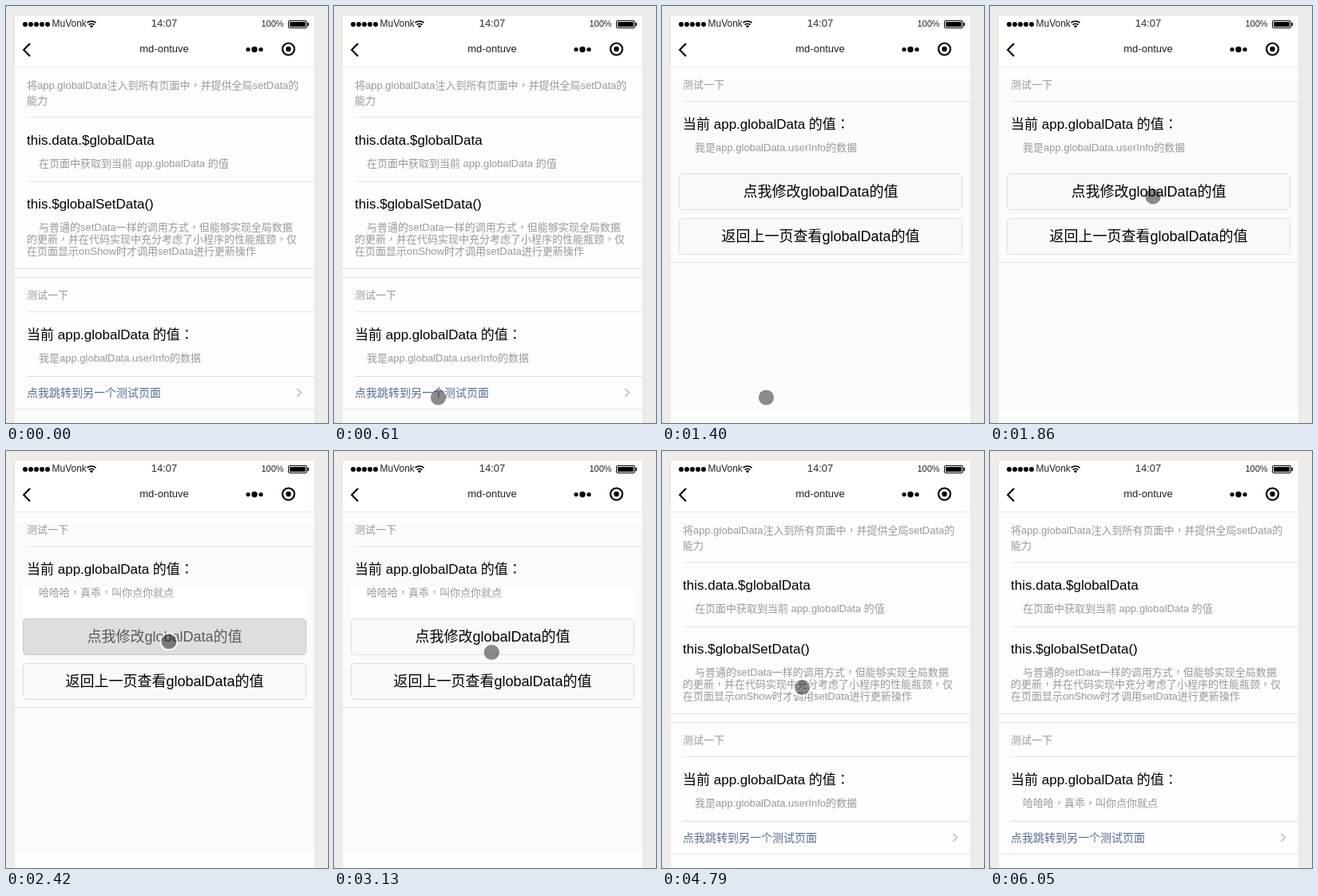
Animation, 403 px wide and 523 px high, one loop 6.96 s. Source, as an HTML page:

```html
<!DOCTYPE html>
<html lang="zh-CN">
<head>
<meta charset="utf-8">
<style>
  html, body { margin: 0; width: 100%; height: 100%; overflow: hidden; background: #edece8; }
  svg { display: block; }
  text { font-family: "Liberation Sans", "Noto Sans CJK SC", "Noto Sans CJK", sans-serif; white-space: pre; }
  .mark { font-family: "Noto Sans CJK TC", "Noto Sans CJK", sans-serif; }
</style>
</head>
<body>
<svg id="stage" width="403" height="523" viewBox="0 0 403 523">
  <defs><clipPath id="screen"><rect x="11" y="12" width="375" height="511"/></clipPath></defs>
  <rect width="403" height="523" fill="#edece8"/>
  <rect x="10.5" y="11.5" width="376" height="520" fill="#fdfdfd" stroke="#e6e5e1"/>
  <g clip-path="url(#screen)">
    <g id="home">
      <rect id="cellHover" x="11" y="465" width="375" height="40" fill="#ececec"/>
      <rect id="linkHover" x="26" y="474" width="330" height="22" fill="#000" fill-opacity=".08"/>
      <path d="M364 480l5.5 5-5.5 5" fill="none" stroke="#c8c8cd" stroke-width="2"/>
    </g>
    <g id="detail">
      <rect x="11" y="93" width="375" height="413" fill="#fbfbfb"/>
      <rect id="band" x="21" y="171" width="355" height="39" fill="#fff"/>
    </g>
    <rect x="11" y="12" width="375" height="64" fill="#fff"/>
    <rect x="11" y="76" width="375" height="1" fill="#e6e6e6"/>
    <g id="bar">
      <path d="M24 23h28.1" stroke="#000" stroke-width="6" stroke-linecap="round" stroke-dasharray="0 7"/>
      <g fill="none" stroke="#000" stroke-width="1.7">
        <path d="M101.5 21.2a8 8 0 0 1 11 0M103.6 23.6a5 5 0 0 1 6.8 0"/>
      </g>
      <path d="M107 27.6l-2.2-2.4a3.2 3.2 0 0 1 4.4 0z"/>
      <rect x="353.5" y="18.5" width="23" height="9" rx="1.5" fill="none" stroke="#000"/>
      <rect x="355" y="20" width="20" height="6"/>
      <path d="M377.5 21h1.5v4h-1.5z"/>
      <path d="M30 47l-7.8 8 7.8 8" fill="none" stroke="#000" stroke-width="2.1"/>
      <circle cx="303" cy="54.5" r="2.6"/>
      <circle cx="311" cy="54.5" r="3.7"/>
      <circle cx="319" cy="54.5" r="2.6"/>
      <circle cx="353.5" cy="54" r="7.5" fill="none" stroke="#000" stroke-width="2.2"/>
      <circle cx="353.5" cy="54" r="3.2"/>
    </g>
  </g>
  <g id="cursor">
    <circle r="9.6" fill="#000" fill-opacity=".45"/>
    <circle id="ring" r="10.4" fill="none" stroke="#fff" stroke-opacity=".8" stroke-width="1.8"/>
  </g>
</svg>
<script>
const LOOP = 6960, TICK = 90;
const GREY = '#999', BLACK = '#000';
const BEFORE = '我是app.globalData.userInfo的数据';
const AFTER = '哈哈哈，真乖，叫你点你就点';
const HEADING = '当前 app.globalData 的值：';
const $ = id => document.getElementById(id);

function add(parent, tag, attrs) {
  const el = document.createElementNS('http://www.w3.org/2000/svg', tag);
  for (const key in attrs) el.setAttribute(key, attrs[key]);
  return parent.appendChild(el);
}

// Traditional-style punctuation sits in the middle of its cell.
function write(el, content) {
  el.innerHTML = content.replace(/[，：]/g, '<tspan class="mark" lang="zh-Hant">$&</tspan>');
}
function label(parent, x, y, size, fill, content, anchor = 'start') {
  const el = add(parent, 'text', { x, y, 'font-size': size, fill, 'text-anchor': anchor });
  write(el, content);
  return el;
}
const rule = (parent, x, y, fill = '#e4e4e4') =>
  add(parent, 'rect', { x, y, width: 386 - x, height: 1, fill });

function button(parent, y, content) {
  const box = add(parent, 'rect', { x: 21.5, y: y + .5, width: 354, height: 45, rx: 4.5, fill: '#f9f9f9', stroke: '#dedede' });
  const text = label(parent, 198.5, y + 29, 18, BLACK, content, 'middle');
  return { box, text };
}

const bar = $('bar'), home = $('home'), detail = $('detail');
label(bar, 57.5, 26, 12, '#222', 'MuVonk');
label(bar, 198, 26, 13, '#333', '14:07', 'middle');
label(bar, 319.5, 26, 11, '#222', '100%');
label(bar, 198, 58, 13, '#222', 'md-ontuve', 'middle');

label(home, 26, 104, 13, GREY, '将app.globalData注入到所有页面中，并提供全局setData的');
label(home, 26, 123, 13, GREY, '能力');
rule(home, 26, 139);
label(home, 26, 174, 17, BLACK, 'this.data.$globalData');
label(home, 41, 202, 13, GREY, '在页面中获取到当前 app.globalData 的值');
rule(home, 26, 220);
label(home, 26, 254, 17, BLACK, 'this.$globalSetData()');
label(home, 41, 282, 13, GREY, '与普通的setData一样的调用方式，但能够实现全局数据');
label(home, 26, 297, 13, GREY, '的更新，并在代码实现中充分考虑了小程序的性能瓶颈，仅');
label(home, 26, 312, 13, GREY, '在页面显示onShow时才调用setData进行更新操作');
rule(home, 11, 329);
rule(home, 11, 340);
label(home, 26, 367, 13, GREY, '测试一下');
rule(home, 26, 383);
label(home, 26, 418, 17, BLACK, HEADING);
const homeValue = label(home, 41, 446, 13, GREY, BEFORE);
rule(home, 26, 464, '#dadada');
const link = label(home, 26, 490, 14, '#586c94', '点我跳转到另一个测试页面');
rule(home, 11, 505);

label(detail, 26, 103, 13, GREY, '测试一下');
rule(detail, 26, 119);
label(detail, 26, 154, 17, BLACK, HEADING);
const detailValue = label(detail, 41, 182, 13, GREY, BEFORE);
const edit = button(detail, 210, '点我修改globalData的值');
button(detail, 266, '返回上一页查看globalData的值');
rule(detail, 11, 321);

const within = (t, from, to) => t >= from && t < to;
const show = (el, on) => el.setAttribute('visibility', on ? 'visible' : 'hidden');
const easeOut = power => p => 1 - (1 - p) ** power;
const smooth = p => p * p * (3 - 2 * p);

// Progress that jumps once per tick; the first jump lands at `start`.
const steps = (t, start, count) =>
  Math.max(0, Math.min(count, Math.floor((t - start) / TICK) + 1)) / count;

const moves = [
  { start: 520, count: 2, to: [130.5, 491], ease: easeOut(2) },
  { start: 1590, count: 4, to: [204, 239], ease: easeOut(4) },
  { start: 3130, count: 8, to: [175.5, 296.5], ease: easeOut(2) },
  { start: 5690, count: 4, to: [258, 502], ease: smooth }
];

function cursorAt(t) {
  let [x, y] = [133, 511];
  for (const { start, count, to, ease } of moves) {
    const p = ease(steps(t, start, count));
    x += (to[0] - x) * p;
    y += (to[1] - y) * p;
  }
  return [x, y];
}

function draw(t) {
  const linkDown = within(t, 1040, 1400);
  show($('cellHover'), within(t, 1040, 1220));
  show($('linkHover'), linkDown);
  link.setAttribute('opacity', linkDown ? .65 : 1);
  write(homeValue, t < 4880 ? BEFORE : AFTER);

  const slide = easeOut(1.338)(steps(t, 1220, 3));
  detail.setAttribute('transform', `translate(${Math.round(375 * (1 - slide))} 0)`);
  detail.setAttribute('display', within(t, 1220, 4790) ? 'inline' : 'none');
  write(detailValue, t < 2420 ? BEFORE : AFTER);
  show($('band'), t >= 2420);

  const editDown = within(t, 2420, 2510);
  edit.box.setAttribute('fill', editDown ? '#dedede' : '#f9f9f9');
  edit.box.setAttribute('stroke', editDown ? '#c8c8c8' : '#dedede');
  edit.text.setAttribute('opacity', editDown ? .6 : 1);

  show($('cursor'), within(t, 430, 6050));
  show($('ring'), linkDown || editDown || within(t, 4790, 4880));
  $('cursor').setAttribute('transform', `translate(${cursorAt(t)})`);
}

const origin = performance.now();
function frame() {
  draw((performance.now() - origin) % LOOP);
  requestAnimationFrame(frame);
}
frame();
</script>
</body>
</html>
```
